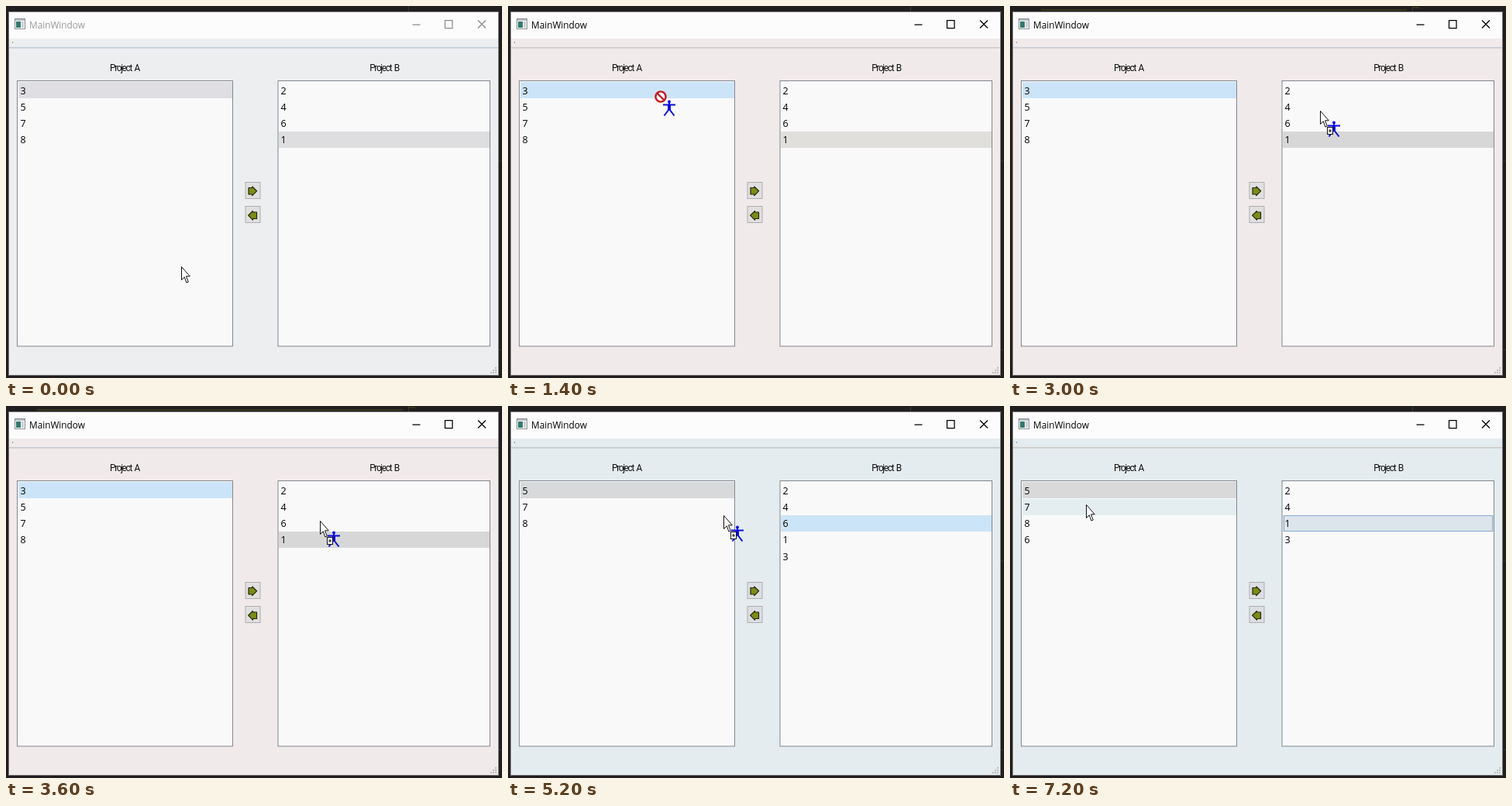
Recreate the animation shown at these times as an HTML page. Size 640 by 480 pixels, loop 7800 ms.

```html
<!DOCTYPE html>
<html lang="en">
<head>
<meta charset="utf-8">
<title>MainWindow</title>
<style>
  html, body { margin: 0; width: 100%; height: 100%; overflow: hidden; background: #211e1f; }
  svg { display: block; width: 100%; height: 100%; }
  text { font: 12px "Open Sans", "Noto Sans", sans-serif; }
  .title { font-size: 11.8px; }
  .label { font: 12px Roboto, sans-serif; letter-spacing: -1.4px; word-spacing: 2px; text-anchor: middle; fill: #111; }
  .list { fill: #f9f9f9; stroke: #828790; }
  .item { font-size: 12.5px; fill: #000; }
  .button { stroke: #adadad; }
  .arrow { fill: #7d8c17; stroke: #24270c; stroke-width: 1.2; stroke-linejoin: round; }
  .line { fill: none; }
</style>
</head>
<body>
<svg viewBox="0 0 640 480" preserveAspectRatio="none">
  <rect width="640" height="480" fill="#211e1f"/>
  <path d="M519.5 0V8" stroke="#3a3738"/>
  <path d="M636 200h4M636 443.5h4" stroke="#363334"/>
  <path id="glint" class="line" d="M40 5H512M520 2H528" stroke="#4e4b16"/>

  <rect id="body" x="3.5" y="7.5" width="632" height="469" stroke="#777576"/>
  <rect x="4" y="8" width="631" height="34" fill="#fcfcfc"/>
  <path id="rule" d="M4 53.8H635" stroke-width="1.2"/>
  <rect x="8" y="46" width="1" height="2" fill="#999"/>

  <rect x="11.5" y="16.5" width="13" height="13" fill="#f7f7f7" stroke="#8b8f93"/>
  <rect x="12" y="17" width="12" height="2" fill="#b7bcc1"/>
  <rect x="13" y="20" width="6" height="8" fill="#36796f"/>
  <rect x="20" y="20" width="3" height="8" fill="#ccd3d6"/>
  <text id="caption" class="title" x="30" y="28.5">MainWindow</text>
  <path id="controls" class="line" stroke-width="1.25" d="M524.5 24H534.5M566.5 18.5H576V28.5H566.5ZM609 18.5L619 28.5M619 18.5L609 28.5"/>

  <text class="label" x="153" y="83.5">Project A</text>
  <text class="label" x="488" y="83.5">Project B</text>
  <rect class="list" x="14.5" y="96.5" width="278" height="342.5"/>
  <rect class="list" x="351" y="96.5" width="273.5" height="342.5"/>
  <g id="left"></g>
  <g id="right"></g>

  <g id="buttons">
    <rect class="button" x="309" y="227.5" width="19" height="21"/>
    <rect class="button" x="309" y="258.5" width="19" height="21"/>
  </g>
  <path class="arrow" d="M313 234.5H317.8V233L323.7 238.7L317.8 244.7V243H313Z"/>
  <path class="arrow" d="M323.5 266H318.5V264.5L312.6 270.2L318.5 276.2V274.5H323.5Z"/>
  <path d="M631 466h2v2h-2zM628 469h2v2h-2zM631 469h2v2h-2zM625 472h2v2h-2zM628 472h2v2h-2zM631 472h2v2h-2z" fill="#bcbcbc"/>

  <g id="pointer">
    <g id="man" stroke="#0909df" fill="#0909df">
      <circle cx="18" cy="15.5" r="2" stroke="none"/>
      <path class="line" d="M10 19.5H26M18 16V26M18 25L11.5 33.5M18 25L24.5 33.5" stroke-width="2"/>
      <rect x="16" y="19" width="4" height="7" stroke="none"/>
    </g>
    <path id="cursor" d="M.5 .5V17.5L4.3 13.8L6.9 21L9.3 20L6.5 12.8H11.3Z" fill="#fff" stroke="#111"/>
    <g id="plus">
      <rect x="9.5" y="21.5" width="7" height="9" fill="#fff" stroke="#111"/>
      <path d="M11 26H15M13 24V28" stroke="#111"/>
    </g>
    <g id="stop" class="line" stroke="#c9161d" stroke-width="2.4">
      <circle cx="7" cy="9" r="6.6" fill="#fff"/>
      <path d="M2.5 4.5L11.5 13.5"/>
    </g>
  </g>
</svg>
<script>
const LOOP = 7800, TICK = 200, ROW = 21.3;
const $ = id => document.getElementById(id);

// time, x, y of the pointer's hot spot
const path = [
  [0, 226, 336], [200, 226, 318], [600, 224, 205], [1000, 221, 96],
  [1200, 208, 104], [1400, 190, 108], [2000, 142, 128], [2400, 265, 126],
  [2600, 330, 128], [3000, 400, 135], [3600, 405, 148], [4200, 406, 150],
  [4800, 406, 150], [5000, 375, 148], [5400, 180, 134], [5600, 112, 128],
  [5800, 99, 127], [7200, 98, 127]
];

const FOCUS = "#84a9cf";
// each scene: start, body colour, rule colour, left rows, right rows,
// then marks as [row, fill, border]
const scenes = [
  { at: 0, body: "#edeef0", rule: "#b3bfd4", left: "3578", right: "2461",
    a: [[0, "#dfdee2"]], b: [[3, "#dedddf"]] },
  { at: 600, body: "#ebeff0", rule: "#b9c1c9", left: "3578", right: "2461",
    a: [[0, "#e2dfdb", "#d3d3d1"]], b: [[3, "#e2dfdb", "#d0d3d8"]] },
  { at: 1400, body: "#f1eaea", rule: "#c5c2c4", left: "3578", right: "2461", drag: "right",
    a: [[0, "#cce4f7"]], b: [[3, "#e1dfdc"]] },
  { at: 2600, body: "#f1eaea", rule: "#b9c1c9", left: "3578", right: "2461", drag: "right", glint: true,
    a: [[0, "#cce4f7"]], b: [[3, "#d7d7d7"]] },
  { at: 3800, body: "#e4ecef", rule: "#b9bfc2", left: "578", right: "24613",
    a: [[0, "#cde1f7", FOCUS]], b: [[2, "#e5eef1"], [3, "#dadbdd", "#cdcfd1"]] },
  { at: 4800, body: "#e4ecef", rule: "#b9bfc2", left: "578", right: "24613", drag: "left",
    a: [[0, "#d8d9da"]], b: [[2, "#cce4f7"]] },
  { at: 5800, body: "#e6edef", rule: "#b9bfc2", left: "5786", right: "2413",
    a: [[0, "#d6d9da"], [1, "#e6eef0"]], b: [[2, "#dce5ec", FOCUS]] },
  { at: 6400, body: "#e4ecef", rule: "#c6c1b7", left: "5786", right: "2413",
    a: [[0, "#d9d9d9"], [1, "#e4eef1"]], b: [[2, "#dce5ec", FOCUS]] }
];

function rows(x, width, items, marks) {
  const bands = marks.map(([row, fill, border]) => {
    const y = Math.round(98.2 + row * ROW);
    const frame = border
      ? `<rect x="${x + 1.5}" y="${y + .5}" width="${width - 3}" height="20" fill="none" stroke="${border}"/>`
      : "";
    return `<rect x="${x}" y="${y}" width="${width}" height="21" fill="${fill}"/>` + frame;
  });
  const texts = [...items].map((s, i) =>
    `<text class="item" x="${x + 2.5}" y="${113.5 + i * ROW}">${s}</text>`);
  return bands.concat(texts).join("");
}

function position(t) {
  const i = path.findIndex(p => p[0] > t);
  if (i < 0) return path[path.length - 1].slice(1);
  const [t0, x0, y0] = path[i - 1], [t1, x1, y1] = path[i];
  const k = (t - t0) / (t1 - t0);
  return [x0 + (x1 - x0) * k, y0 + (y1 - y0) * k];
}

const show = (id, on) => $(id).setAttribute("display", on ? "inline" : "none");

let current;
function setScene(s) {
  current = s;
  $("body").setAttribute("fill", s.body);
  $("rule").setAttribute("stroke", s.rule);
  $("buttons").setAttribute("fill", s.at < 3800 ? "#e1e0e0" : "#dcdee3");
  const active = s.at >= 1400;
  $("caption").setAttribute("fill", active ? "#000" : "#999");
  $("controls").setAttribute("stroke", active ? "#000" : "#8c8c8c");
  $("left").innerHTML = rows(16, 276, s.left, s.a);
  $("right").innerHTML = rows(352, 272, s.right, s.b);
  show("glint", s.glint);
}

function draw(now) {
  const t = Math.floor((now % LOOP) / TICK) * TICK;
  const scene = scenes.filter(s => s.at <= t).pop();
  if (scene !== current) setScene(scene);

  const [x, y] = position(t).map(Math.round);
  const { drag } = scene;
  const allowed = drag === "right" ? x > 350 : x < 293;
  $("pointer").setAttribute("transform", `translate(${x} ${y})`);
  show("man", drag);
  show("plus", drag && allowed);
  show("stop", drag && !allowed);
  show("cursor", !drag || allowed);
}

const start = performance.now();
function loop() {
  draw(performance.now() - start);
  requestAnimationFrame(loop);
}
loop();
</script>
</body>
</html>
```
